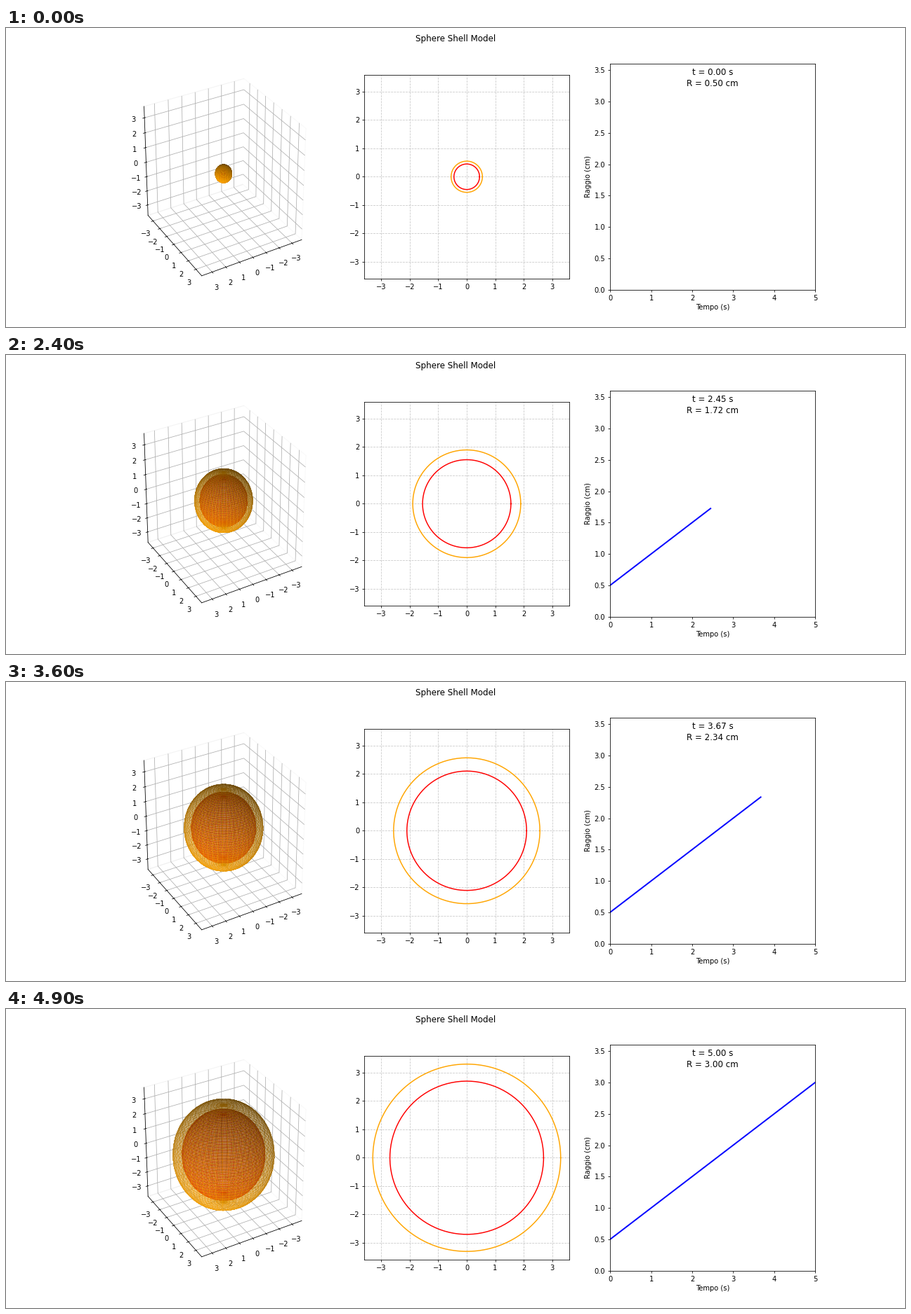
Write a matplotlib script that moves like this. It is 1280 by 427 pixels and loops after 5000 ms.

```python
import numpy as np
import matplotlib.pyplot as plt
from matplotlib.animation import FuncAnimation
from mpl_toolkits.mplot3d.art3d import Poly3DCollection

W, H = 1280, 427
DPI = W / 18
PAD = 0.01  # keeps the pixel size from rounding down
FRAMES, INTERVAL = 50, 100
T_END, LIMIT = 5, 3.6
INNER, OUTER = 0.9, 1.1

times = np.linspace(0, T_END, FRAMES)
radii = 0.5 + 0.5 * times
angle = np.linspace(0, 2 * np.pi, 200)
ticks = np.arange(-3, 4)

plt.rcParams["font.family"] = "DejaVu Sans"
fig = plt.figure(figsize=((W + PAD) / DPI, (H + PAD) / DPI), dpi=DPI,
                 facecolor="white")
fig.subplots_adjust(left=0.125, right=0.9, bottom=0.125, top=0.88, wspace=0.2)
fig.suptitle("Sphere Shell Model")


def unit_sphere(n=50):
    """Quads of a unit sphere, wound so that their normals point inwards."""
    v, u = np.meshgrid(np.linspace(1e-3, np.pi - 1e-3, n),
                       np.linspace(0, 2 * np.pi, n), indexing="ij")
    p = np.stack([np.cos(u) * np.sin(v), np.sin(u) * np.sin(v), np.cos(v)], -1)
    quads = np.stack([p[:-1, :-1], p[:-1, 1:], p[1:, 1:], p[1:, :-1]], 2)
    return quads.reshape(-1, 4, 3)


# Perspective view: a cube stretched to fill its slot
space = fig.add_subplot(131, projection="3d")
space.apply_aspect = lambda position=None: None
space.set_box_aspect((1, 1, 1), zoom=0.94675)
space.view_init(elev=30, azim=60)
edge = LIMIT * 25 / 24
space.set(xlim=(-edge, edge), ylim=(-edge, edge), zlim=(-edge, edge),
          xticks=ticks, yticks=ticks, zticks=ticks)
for axis in (space.xaxis, space.yaxis, space.zaxis):
    axis.pane.fill = False

sphere = unit_sphere()


def add_shell(color):
    shell = Poly3DCollection(sphere, facecolors=color, alpha=0.3, shade=True,
                             linewidths=0, antialiased=False)
    space.add_collection3d(shell)
    return shell


# Cross-section
section = fig.add_subplot(132)
section.set(xlim=(-LIMIT, LIMIT), ylim=(-LIMIT, LIMIT),
            xticks=ticks, yticks=ticks, aspect="equal")
section.grid(True, linestyle="--", alpha=0.7)

# Radius against time
chart = fig.add_subplot(133)
chart.set(xlim=(0, T_END), ylim=(0, LIMIT),
          xlabel="Tempo (s)", ylabel="Raggio (cm)")
curve, = chart.plot([], [], color="blue", lw=2)
time_text, radius_text = (
    chart.text(0.5, y, "", ha="center", fontsize=12, transform=chart.transAxes)
    for y in (0.95, 0.9))

shells = [(scale, add_shell(color), section.plot([], [], color=color)[0])
          for scale, color in ((INNER, "red"), (OUTER, "orange"))]


def update(i):
    t, r = times[i], radii[i]
    for scale, shell, ring in shells:
        shell.set_verts(sphere * r * scale)
        ring.set_data(r * scale * np.cos(angle), r * scale * np.sin(angle))
    curve.set_data(times[:i + 1], radii[:i + 1])
    time_text.set_text(f"t = {t:.2f} s")
    radius_text.set_text(f"R = {r:.2f} cm")


anim = FuncAnimation(fig, update, frames=FRAMES, interval=INTERVAL,
                     init_func=lambda: update(0), repeat=True, repeat_delay=0)
plt.show()
```
